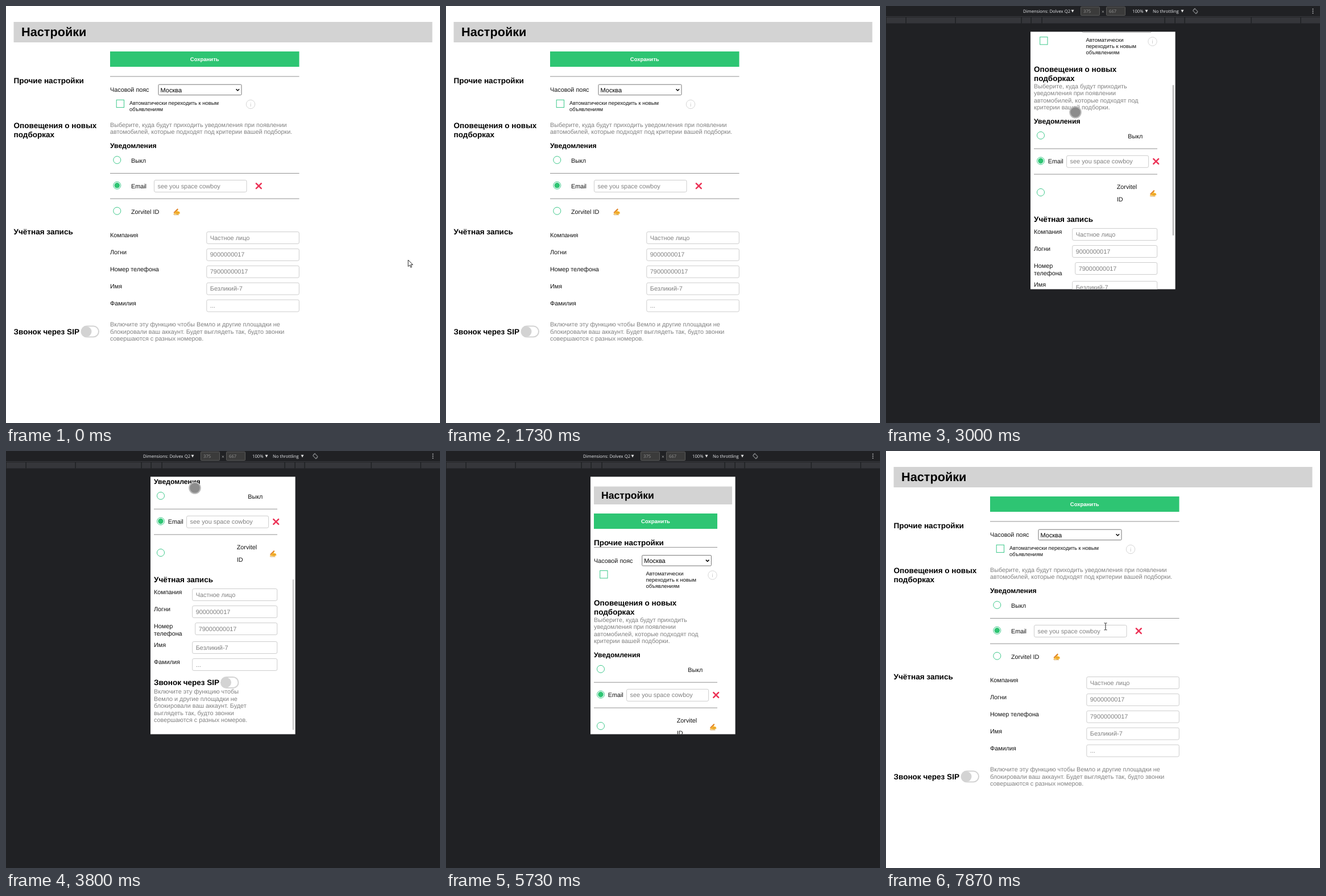
Recreate the animation shown at these times as an HTML page. Size 763 by 734 pixels, loop 8000 ms.

```html
<!DOCTYPE html>
<html lang="ru">
<head>
<meta charset="utf-8">
<title>Настройки</title>
<style>
html, body { margin: 0; width: 100%; height: 100%; overflow: hidden; background: #fff; }
svg { display: block; }
text { font-family: "Liberation Sans", Arial, sans-serif; text-rendering: geometricPrecision; white-space: pre; }
.ui { font-family: "Open Sans", "Noto Sans", sans-serif; }
</style>
</head>
<body>
<svg id="stage" width="763" height="734" viewBox="0 0 763 734"></svg>
<script>
const GREEN = '#2ec573', GREY = '#808080', BODY = 10.8, LEAD = 12.5;
const stage = document.getElementById('stage');

// Markup helpers
const text = (x, y, s, size = BODY, fill = '#111', extra = '') =>
  `<text x="${x}" y="${y}" font-size="${size}" fill="${fill}" ${extra}>${s}</text>`;
const bold = (x, y, s, size = 13.56, fill = '#000', extra = '') =>
  text(x, y, s, size, fill, 'font-weight="700" ' + extra);
const lines = (x, y, s, lead = LEAD, size = BODY, fill = GREY) =>
  s.split('|').map((row, i) => text(x, y + i * lead, row, size, fill)).join('');
const rect = (x, y, w, h, fill, extra = '') =>
  `<rect x="${x}" y="${y}" width="${w}" height="${h}" fill="${fill}" ${extra}/>`;
const circle = (x, y, r, fill, stroke = 'none', width = 1) =>
  `<circle cx="${x}" cy="${y}" r="${r}" fill="${fill}" stroke="${stroke}" stroke-width="${width}"/>`;
const path = (d, fill = 'none', stroke = 'none', width = 1, extra = '') =>
  `<path d="${d}" fill="${fill}" stroke="${stroke}" stroke-width="${width}" ${extra}/>`;
const group = (id, body, extra = '') => `<g id="${id}" ${extra}>${body}</g>`;

// Form controls
const rule = (x, y, w) => rect(x, y, w, 1, '#929292');
const input = (x, y, w, s) =>
  rect(x, y, w, 21, '#fff', 'rx="2.5" stroke="#cdcdcd"') + text(x + 6, y + 14, s, 10.9, GREY);
const radio = (x, y, on) => circle(x, y, 6.5, '#fff', '#3cc88a') + (on ? circle(x, y, 4.8, GREEN) : '');
const checkbox = (x, y) => rect(x, y, 13.3, 13.3, '#fff', 'stroke="#3cc88a"');
const select = (x, y, w) =>
  rect(x, y, w, 18.5, '#fff', 'rx="1.5" stroke="#767676"') + text(x + 3.5, y + 13.3, 'Москва', 11, '#000') +
  path(`M${x + w - 9.5} ${y + 8}l2.8 2.8 2.8-2.8`, 'none', '#000', 1.5);
const info = (x, y) => circle(x, y, 7.7, '#fff', '#d6d6d6') + text(x, y + 3.6, 'i', 10, '#c8c8c8', 'text-anchor="middle"');
const cross = (x, y) => path(`M${x - 4.4} ${y - 4.4}l8.8 8.8m0-8.8l-8.8 8.8`, 'none', '#ec3357', 2.6, 'stroke-linecap="round"');
const writingHand = (x, y) => `<g transform="translate(${x} ${y})">` +
  path('M-6 5L-2-1 2-5 3-4 1-1 5 0 6 3 2 5-3 4Z', '#f8b530') +
  path('M-5 2L2-5', 'none', '#d9782d', 1.6) + path('M-1 2h5M-5 5.5h9', 'none', '#c88a2a', .8) + '</g>';
const toggle = (x, y) =>
  rect(x, y, 30.5, 19, '#fff', 'rx="9.5" stroke="#d3d3d3" stroke-width="2"') + circle(x + 9, y + 9.5, 9, '#d3d3d3');
const saveButton = (x, y, w) =>
  rect(x, y, w, 27, GREEN) + bold(x + w / 2, y + 17, 'Сохранить', 9.5, '#fff', 'text-anchor="middle"');

const ACCOUNT = [['Компания', 'Частное лицо'], ['Логни', '9000000017'], ['Номер телефона', '79000000017'],
  ['Имя', 'Безликий-7'], ['Фамилия', '...']];

const desktop = rect(0, 0, 763, 734, '#fff') +
  rect(13.5, 28, 736, 36, '#d3d3d3') + bold(27, 53, 'Настройки', 21.7) +
  saveButton(183, 80, 332.5) + rule(183, 123.5, 332.5) +
  bold(13.5, 136, 'Прочие настройки') + text(183, 151.3, 'Часовой пояс') + select(268, 138.2, 146) +
  checkbox(194.2, 165.3) + lines(217, 174, 'Автоматически переходить к новым|объявлениям', 10.9, 9.45, '#111') + info(430, 173) +
  bold(13.5, 215, 'Оповещения о новых') + bold(13.5, 230.7, 'подборках') +
  lines(183, 212.7, 'Выберите, куда будут приходить уведомления при появлении|автомобилей, которые подходят под критерии вашей подборки.') +
  bold(183, 249.8, 'Уведомления', 12.2) +
  radio(195.3, 271) + text(220, 275.7, 'Выкл') + rule(183, 294, 332.5) +
  radio(195.3, 315.8, true) + text(220, 320.5, 'Email') + input(260.5, 306.5, 162.5, 'see you space cowboy') +
  cross(444.3, 316.8) + rule(183, 338.7, 332.5) +
  radio(195.3, 360.7) + text(220, 365.5, 'Zorvitel ID') + writingHand(300, 362) +
  bold(13.5, 401.5, 'Учётная запись') +
  ACCOUNT.map(([label, value], i) =>
    text(183, 407 + i * 29.9, label) + input(352.8, 397.5 + i * 29.9, 162.5, value)).join('') +
  bold(13.5, 577.7, 'Звонок через SIP') + toggle(132.5, 563.6) +
  lines(183, 564.3, 'Включите эту функцию чтобы Вемло и другие площадки не|блокировали ваш аккаунт. Будет выглядеть так, будто звонки|совершаются с разных номеров.');

const mobileAccount = ACCOUNT.map(([label, value], i) => {
  const y = 557 + i * 30 + (i > 2 ? 3 : 0), wide = i === 2;
  return lines(260, y, wide ? label.replace(' ', '|') : label, LEAD, BODY, '#111') +
    input(wide ? 332.7 : 327.7, y - 9.5, wide ? 144 : 149, value);
}).join('');

const mobile = rect(260, 62.5, 243, 31.5, '#d3d3d3') + bold(273, 83.6, 'Настройки', 17.6) +
  saveButton(260, 110, 217) + bold(260, 165.6, 'Прочие настройки', 13.5) + rule(260, 169, 217) +
  text(260, 197, 'Часовой пояс') + select(344.7, 183.6, 121.7) +
  checkbox(270.7, 210.6) + lines(351.5, 219.4, 'Автоматически|переходить к новым|объявлениям', 10.9, 9.45, '#111') + info(468.5, 218.5) +
  bold(260, 272.3, 'Оповещения о новых', 13.5) + bold(260, 288, 'подборках', 13.5) +
  lines(260, 300.9, 'Выберите, куда будут приходить|уведомления при появлении|автомобилей, которые подходят под|критерии вашей подборки.') +
  bold(260, 362.6, 'Уведомления', 12.2) +
  radio(272, 383.8) + text(425.3, 388.5, 'Выкл') + rule(260, 406.7, 217) +
  radio(272, 428.6, true) + text(284.7, 433.4, 'Email') + input(317.6, 419.3, 144, 'see you space cowboy') +
  cross(474.7, 429.5) + rule(260, 451.6, 217) +
  radio(272, 484) + lines(405.7, 478.3, 'Zorvitel|ID', 21.7, BODY, '#111') + writingHand(469.5, 485.5) +
  bold(260, 535.6, 'Учётная запись', 13.5) + mobileAccount +
  bold(260, 717, 'Звонок через SIP', 13.5) + toggle(378, 703) +
  lines(260, 732, 'Включите эту функцию чтобы|Вемло и другие площадки не|блокировали ваш аккаунт. Будет|выглядеть так, будто звонки|совершаются с разных номеров.');

const ui = (x, y, s, size = 7.7, fill = '#e8eaed', extra = '') => text(x, y, s, size, fill, 'class="ui" ' + extra);
const caret = x => path(`M${x} 6.8h5l-2.5 4.6z`, '#e0e0e0');
const sizeField = (x, s) => rect(x, 1.5, 33, 15, '#3b3b3b', 'rx="1" stroke="#5a5a5a"') + ui(x + 4.5, 12, s, 7.7, '#969696');
const toolbar = rect(0, 0, 763, 734, '#202124') +
  ui(241, 12, 'Dimensions: Dolvex Q2') + caret(325.5) + sizeField(342.5, '375') + ui(379, 12.5, '×', 8.5, '#aaa') +
  sizeField(387.5, '667') + ui(433, 12, '100%') + caret(455.5) + ui(469, 12, 'No throttling') + caret(518.5) +
  rect(541.3, 5.5, 5, 7, 'none', 'stroke="#8a8c8f" transform="rotate(-45 543.8 9)"') +
  path('M540 7a4.5 4.5 0 0 1 4-2.8M548 11a4.5 4.5 0 0 1-4 2.8', 'none', '#8a8c8f', .8) +
  [5.5, 9, 12.5].map(y => circle(750.5, y, 1, '#b8babd')).join('') +
  rect(0, 18, 763, 1, '#3a3b3f') + rect(0, 20, 763, 10.5, '#35363a') +
  [0, 35, 122, 238, 255, 274, 490, 508, 525, 642, 729].map(x => rect(x - .5, 20, 1.2, 10.5, '#1b1c1f')).join('');

const highlight = rect(0, 0, 763, 622, 'rgb(111,168,220)', 'fill-opacity=".66"') +
  `<g style="filter:drop-shadow(0 1px 2px #0007)">${rect(1, 628, 92, 19.5, '#fff', 'rx="2"')}${path('M8 628.5l5.5-5.5 5.5 5.5z', '#fff')}</g>` +
  ui(7.5, 640.8, 'html', 8.3, '#881280', 'font-weight="700"') + ui(33.5, 640.8, '1125 × 916.06', 8, '#777');

stage.innerHTML = `<clipPath id="screen">${rect(254, 45.3, 254.6, 453.2, '#fff')}</clipPath>` +
  group('desktop', desktop) +
  group('device', toolbar + rect(254, 45.3, 254.6, 453.2, '#fff') +
    `<g clip-path="url(#screen)">${group('page', mobile)}</g>` +
    rect(503.8, 0, 2.2, 265, '#b2b2b2', 'id="bar" rx="1"')) +
  group('highlight', highlight) +
  group('arrow', path('M0 0V11.5L2.7 9 4.6 13.2 6.4 12.4 4.6 8.4H8.2Z', '#fff', '#111', .9)) +
  group('touch', circle(0, 0, 9.8, '#8c8c8c', '#bcbcbc', 2)) +
  group('beam', path('M-2.5-6H-.5L0-5.5.5-6h2M0-5.5v11M-2.5 6h2L0 5.5.5 6h2', 'none', '#222', 1));

const part = Object.fromEntries([...stage.querySelectorAll('[id]')].map(el => [el.id, el]));

// Keys are [time, value, value...], with straight motion between them
const POINTER = [[0, 707, 447], [200, 707, 447], [333, 688, 432], [467, 688, 432], [933, 594, 231], [1000, 594, 231],
  [1400, 780, 60], [2400, 780, 330], [2467, 674, 330], [2733, 333, 343], [3000, 333, 187], [3133, 333, 120],
  [3267, 333, 120], [3533, 332, 65], [4133, 332, 65], [4467, 332, 185], [4667, 332, 302], [5000, 332, 302],
  [5667, 752, 22], [5733, 790, 0], [6400, 790, 60], [6533, 758.5, 57], [7067, 411, 90], [7400, 322, 180], [7867, 386, 309]];
const SCROLL = [[2733, 0], [3000, 156], [3133, 223], [3267, 223], [3533, 305], [4133, 305], [4467, 31], [4600, 0]];
const BAR = [[2733, 0], [2800, 1], [3733, 1], [4000, 0], [4133, 0], [4200, 1], [5000, 1], [5200, 0]];

function at(keys, t) {
  const i = keys.findIndex(k => k[0] > t);
  if (i <= 0) return keys.at(i).slice(1);
  const [a, b] = [keys[i - 1], keys[i]], p = (t - a[0]) / (b[0] - a[0]);
  return a.slice(1).map((v, n) => v + (b[n + 1] - v) * p);
}
const show = (el, on) => { el.style.display = on ? '' : 'none'; };

function draw(now) {
  const t = Math.floor((now % 8000) * .015 + .05) / .015; // 15 steps a second
  const device = t > 2260 && t < 6260;
  const [x, y] = at(POINTER, t), [scroll] = at(SCROLL, t);
  const touching = device && x > 254 && x < 509 && y > 45 && y < 499;
  const typing = !device && x > 260 && x < 423 && y > 303 && y < 328;

  show(part.desktop, !device);
  show(part.device, device);
  show(part.highlight, (t > 1390 && t < 1725) || (t > 6325 && t < 6590));
  part.page.setAttribute('transform', `translate(0 ${-scroll})`);
  part.bar.setAttribute('y', 48 + scroll * .584);
  part.bar.setAttribute('opacity', at(BAR, t)[0]);
  for (const [id, on] of [['arrow', !touching && !typing], ['touch', touching], ['beam', typing]]) {
    show(part[id], on);
    part[id].setAttribute('transform', `translate(${x} ${y})`);
  }
}

const start = performance.now();
(function tick() {
  draw(performance.now() - start);
  requestAnimationFrame(tick);
})();
</script>
</body>
</html>
```
